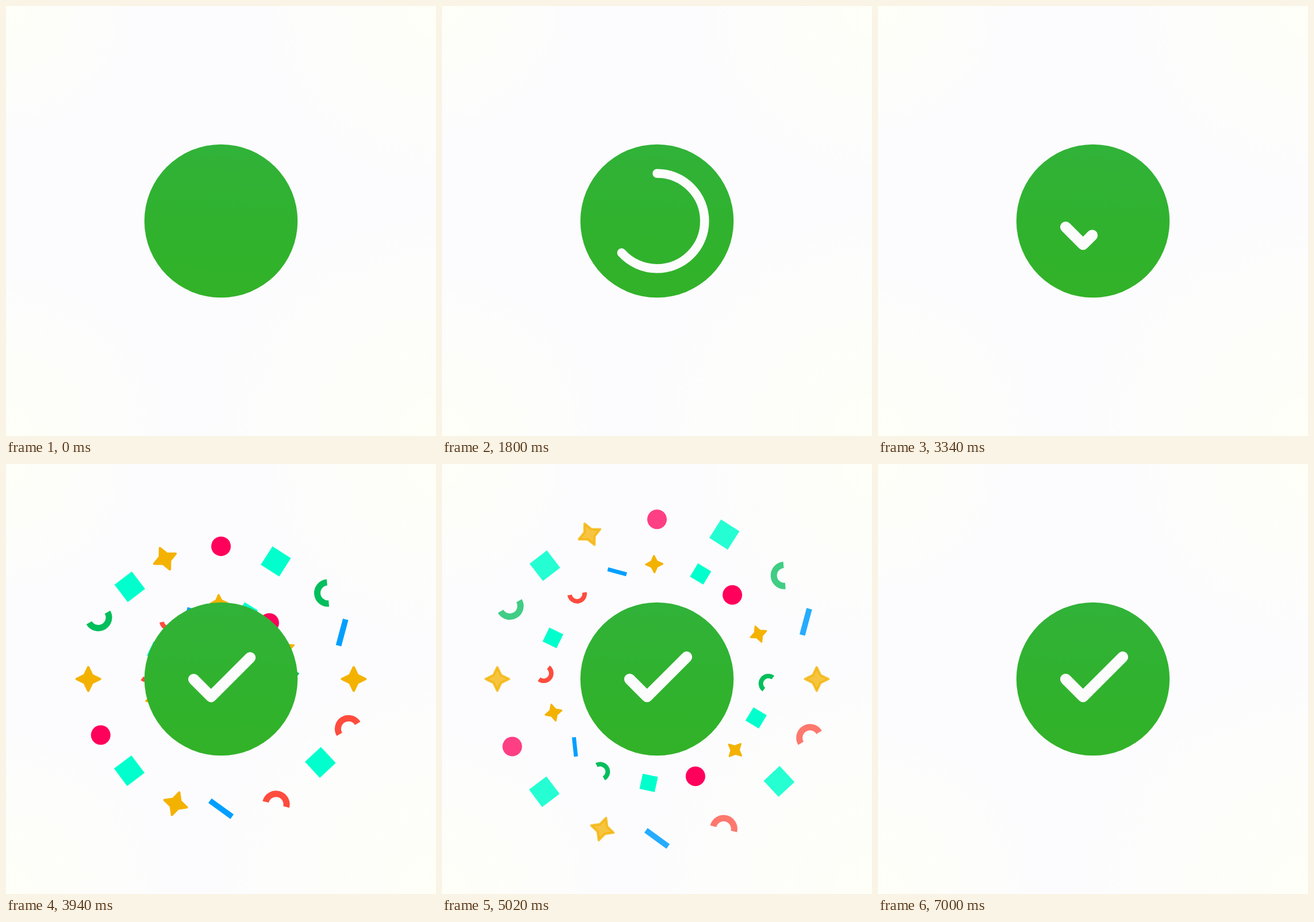
Animation of 748 by 748 pixels, one loop 7.02 s. Source, as an HTML page with a canvas:

```html
<!DOCTYPE html>
<html lang="en">
<head>
<meta charset="utf-8">
<title>Success check</title>
<style>
  html, body { margin: 0; width: 100%; height: 100%; overflow: hidden; background: #fcfcfe; }
  canvas { display: block; width: 748px; height: 748px; }
</style>
</head>
<body>
<canvas id="stage" width="748" height="748"></canvas>
<script>
const SIZE = 748, MID = 374, LOOP = 7020;
const ctx = document.getElementById('stage').getContext('2d');
const RAD = Math.PI / 180;
const WHITE = '#fcfcfd';
const COLORS = {
  dot: '#ff005b', box: '#00ffcc', bar: '#009fff',
  star: '#f4b200', green: '#02be5c', red: '#ff4c3e'
};

// Each piece: kind, direction clockwise from the top, own rotation (degrees)
const OUTER = {
  x: 374, y: 374, reach: 281, scale: 1, start: 65.1, span: 79.7, power: 6, fade: 104.5,
  pieces: [
    ['dot', 0, 0], ['box', 25, 32.5], ['green', 49.5, -95], ['bar', 69, 105],
    ['star', 90, 0], ['red', 109.5, -31], ['box', 130, 47], ['red', 154.5, 14],
    ['bar', 180, 36], ['star', 200, 18], ['box', 225, 53], ['dot', 245, 0],
    ['star', 270, 0], ['green', 295, 150], ['box', 315.3, 52.5], ['star', 335, -25]
  ]
};
const INNER = {
  x: 372.5, y: 365, reach: 194.3, scale: 0.71, start: 73.2, span: 53.2, power: 4, fade: 111.5,
  pieces: [
    ['star', -1, -2], ['box', 24, 31], ['dot', 44, 0], ['star', 68.8, -22],
    ['green', 93.6, -53], ['box', 113.8, 31], ['star', 134, 42], ['dot', 159, 0],
    ['box', 183.9, 12], ['green', 208.4, 61], ['bar', 228, 84], ['star', 249.3, -15],
    ['red', 268.7, 128], ['box', 289.2, 26], ['red', 313.9, 170], ['bar', 339.1, 15]
  ]
};

const clamp = v => Math.min(1, Math.max(0, v));
const smooth = v => v * v * (3 - 2 * v);

// Uneven cadence: three steps every 140 ms
function stepAt(ms) {
  const rest = ms % 140;
  return Math.floor(ms / 140) * 3 + (rest < 20 ? 0 : rest < 120 ? 1 : 2);
}

function drawBackground() {
  ctx.fillStyle = '#fcfcfe';
  ctx.fillRect(0, 0, SIZE, SIZE);
  for (const [x, y, r] of [[0, 0, 240], [SIZE, 0, 330], [0, SIZE, 300], [SIZE, SIZE, 420]]) {
    const g = ctx.createRadialGradient(x, y, 0, x, y, r);
    g.addColorStop(0, 'rgba(254,255,247,1)');
    g.addColorStop(1, 'rgba(254,255,247,0)');
    ctx.fillStyle = g;
    ctx.fillRect(0, 0, SIZE, SIZE);
  }
}

function drawShape(kind) {
  ctx.fillStyle = ctx.strokeStyle = COLORS[kind];
  ctx.beginPath();
  if (kind === 'dot') {
    ctx.arc(0, 0, 17, 0, 7);
    ctx.fill();
  } else if (kind === 'box') {
    ctx.fillRect(-19, -19, 38, 38);
  } else if (kind === 'bar') {
    ctx.fillRect(-23.75, -4.9, 47.5, 9.8);
  } else if (kind === 'star') {
    for (let i = 0; i < 8; i++) {
      const r = i % 2 ? 9.5 : 20.5, a = i * 45 * RAD;
      ctx.lineTo(r * Math.sin(a), -r * Math.cos(a));
    }
    ctx.closePath();
    ctx.lineWidth = 4;
    ctx.lineJoin = 'round';
    ctx.fill();
    ctx.stroke();
  } else {
    ctx.arc(0, 12, 18.5, Math.PI, 0);
    ctx.lineWidth = 11;
    ctx.lineCap = 'butt';
    ctx.stroke();
  }
}

function drawBurst(burst, step) {
  for (const [kind, angle, turn] of burst.pieces) {
    const k = step - (kind === 'box' || kind === 'bar' ? 1 : 0);
    const move = clamp((k - burst.start) / burst.span);
    const alpha = 1 - clamp((k - burst.fade) / 10);
    if (!move || !alpha) continue;
    const inset = kind === 'green' || kind === 'red' ? 2 : 0;
    const r = burst.reach * (1 - (1 - move) ** burst.power) - inset;
    const scale = kind === 'dot' ? 1 : burst.scale;
    ctx.save();
    ctx.globalAlpha = alpha;
    ctx.translate(burst.x + r * Math.sin(angle * RAD), burst.y - r * Math.cos(angle * RAD));
    ctx.rotate(turn * RAD);
    ctx.scale(scale, scale);
    drawShape(kind);
    ctx.restore();
  }
}

function drawDisc() {
  const g = ctx.createLinearGradient(380, 241, 368, 507);
  g.addColorStop(0, '#31b239');
  g.addColorStop(0.5, '#30b22f');
  g.addColorStop(1, '#32b228');
  ctx.fillStyle = g;
  ctx.beginPath();
  ctx.arc(MID, MID, 133.3, 0, 7);
  ctx.fill();
}

function drawRing(step) {
  if (step < 1 || step > 60) return;
  ctx.strokeStyle = WHITE;
  ctx.lineWidth = 15.6;
  ctx.lineCap = 'round';
  ctx.beginPath();
  ctx.arc(MID, MID, 82.8, -90 * RAD, (step * 6 - 90) * RAD);
  ctx.stroke();
}

function drawCheck(step) {
  const p = smooth(clamp((step - 56.7) / 30));
  if (!p) return;
  const points = [[326.5, 374.4], [356.7, 404.6], [425.6, 335.7]];
  const length = Math.SQRT2 * (30.2 + 68.9);
  ctx.save();
  ctx.translate(0, 19 * (1 - p));
  ctx.strokeStyle = WHITE;
  ctx.lineWidth = 19.2;
  ctx.lineCap = ctx.lineJoin = 'round';
  if (p < 1) ctx.setLineDash([length * p, 999]);
  ctx.beginPath();
  points.forEach(([x, y]) => ctx.lineTo(x, y));
  ctx.stroke();
  ctx.restore();
}

function draw() {
  const step = stepAt(performance.now() % LOOP);
  drawBackground();
  drawBurst(INNER, step);
  drawBurst(OUTER, step);
  drawDisc();
  drawRing(step);
  drawCheck(step);
  requestAnimationFrame(draw);
}
draw();
</script>
</body>
</html>
```
